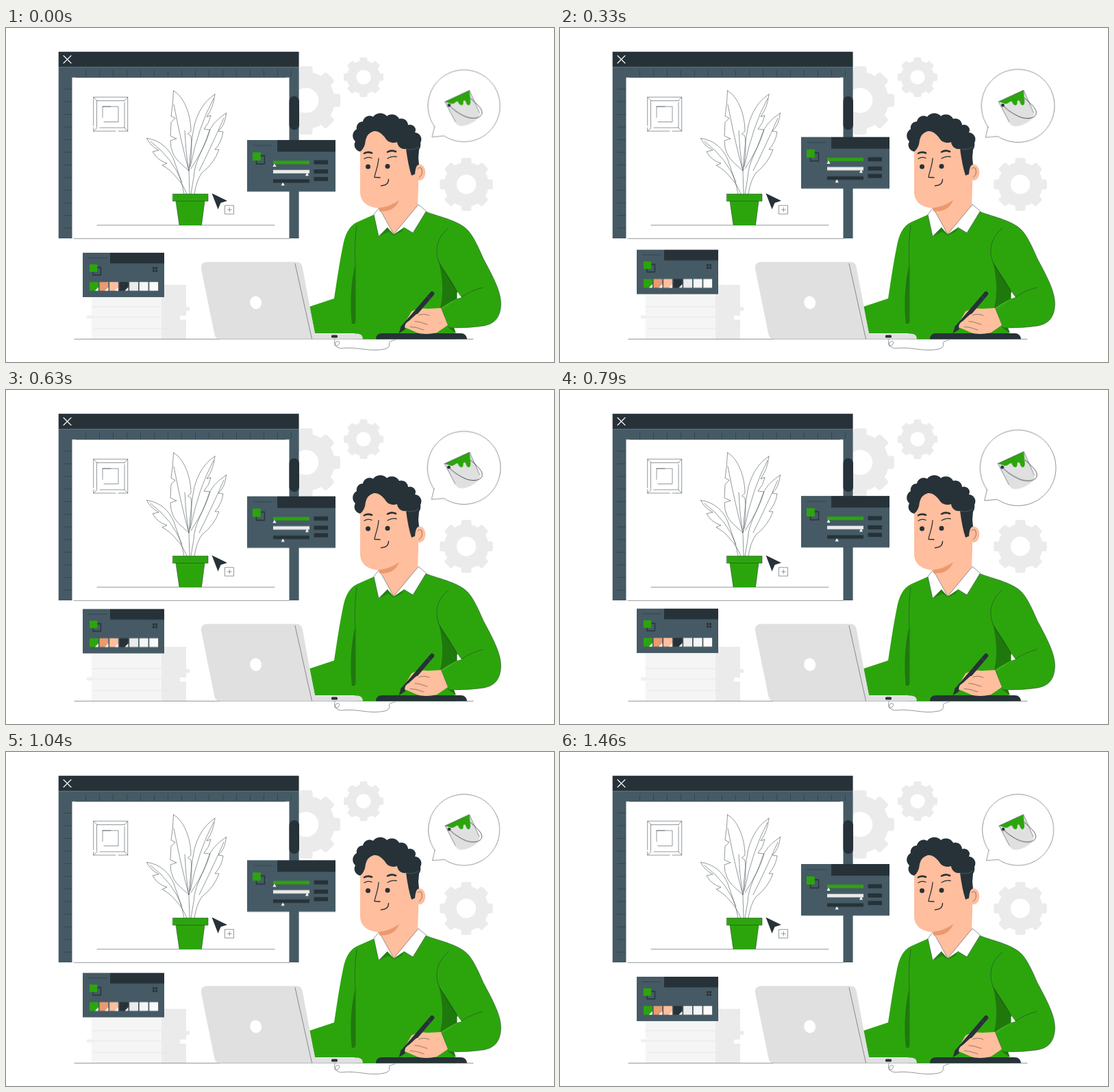
These frames come from a looping animation (800 px wide and 489 px high, 1.5 s). An HTML page:

```html
<!DOCTYPE html>
<html lang="en">
<head>
<meta charset="utf-8">
<title>Designer at work</title>
<style>
html, body { margin: 0; width: 100%; height: 100%; overflow: hidden; background: #fff; }
svg { display: block; width: 100%; height: 100%; }
.ink { fill: #263238; }
.slate { fill: #455a64; }
.green { fill: #2ca50d; }
.shade { fill: #1f780c; }
.skin { fill: #ffbe9d; }
.grey { fill: #e0e0e0; }
.pale { fill: #ebebeb; }
.white { fill: #fff; }
.line { fill: none; stroke: #263238; stroke-width: .5; stroke-linecap: round; stroke-linejoin: round; }
.bold { stroke-width: 1.3; }
.float, .beat { animation: float 1.5s linear -19ms infinite; }
.beat { animation-name: beat; transform-origin: 668px 113.5px; }
@keyframes float {
  0%, 100% { transform: translateY(.3px); }
  50% { transform: translateY(-9.7px); }
}
@keyframes beat {
  0%, 30%, 40%, 70%, 100% { transform: scale(1); }
  10%, 50% { transform: scale(1.08); }
}
</style>
</head>
<body>
<svg viewBox="0 0 800 489" preserveAspectRatio="none">
  <defs>
    <path id="tooth" d="M-11 0L-9.5 -47Q-9 -50 -6 -50H6Q9 -50 9.5 -47L11 0L9.5 47Q9 50 6 50H-6Q-9 50 -9.5 47Z"/>
    <g id="gear">
      <circle r="42"/>
      <use href="#tooth"/>
      <use href="#tooth" transform="rotate(45)"/>
      <use href="#tooth" transform="rotate(90)"/>
      <use href="#tooth" transform="rotate(135)"/>
      <circle r="18.3" class="white"/>
    </g>
    <path id="knob" class="white" d="M0 -2.3L2.6 2.3H-2.6Z"/>
  </defs>

  <!-- gears -->
  <g class="pale">
    <use href="#gear" transform="translate(438 106)"/>
    <use href="#gear" transform="translate(522 72) scale(.58)"/>
    <use href="#gear" transform="translate(672 229) scale(.775)"/>
  </g>

  <!-- editor window -->
  <path class="slate" d="M76.7 57H427.6V308H76.7Z"/>
  <path class="ink" d="M76.7 34.7H427.6V57H76.7Z"/>
  <path class="white" d="M96.5 72.5H413.5V309H96.5Z"/>
  <path d="M77 57.3H427.5V72" fill="none" stroke="#78909c" stroke-width=".6"/>
  <path d="M84 40.5L95 51.5M95 40.5L84 51.5" stroke="#fff" stroke-width="1.1" stroke-linecap="round"/>
  <g id="ticks" class="line"></g>
  <path class="line" d="M102 72.3H408M99 308.3H413.5M133 288.7H278M281 288.7H392"/>
  <rect class="ink" x="413.5" y="100" width="14.5" height="49" rx="7"/>

  <!-- picture frame -->
  <path class="line" d="M127.7 143V101.2H177.7V151H164M160 151H127.7V146M132.5 145V106.5H173M173 109V146H137M141 131V115H164V137.5H143M153 115H141M127.7 101.2L133 106.5M177.7 101.2L173 106.5M177.7 151L173 146M127.7 151L133 146"/>

  <!-- plant -->
  <g class="line">
    <path d="M244.5 92C259 99 270 126 270 151L265.5 155L270 158Q273 183 267 209C262 204 248 194 244 184Q240 176 240 165L249 162L240 158L241 138L247 132L241 129Q244 110 244.5 92Z"/>
    <path d="M245 112Q257 174 267 209L268 243M261 150Q262 178 266 205"/>
    <path d="M305 97C290 107 281 121 275 142Q270 166 267 209M305 97Q303 116 293 130L299 128Q297 139 289 148L298 149Q292 172 270 206M303 103Q281 144 269 203"/>
    <path d="M321.5 124.5Q299 139 294 158C287 181 275 196 274 219L270 243M321.5 124.5Q320 142 310 151L317 152Q315 167 305 178L311 178Q304 198 286 212Q278 223 275 243M318 132Q298 177 282 209"/>
    <path d="M205.5 161.5C226 164 239 178 245 193C251 211 257 225 260 243M205.5 161.5Q210 172 223 179L214 181Q221 194 235 198L228 201Q241 208 249 219Q258 228 264 243M211 166Q244 191 257 226"/>
  </g>
  <path class="green" d="M243.5 243H295V253.5H290L285.5 289H253L248 253.5H243.5Z"/>
  <path class="line" d="M243.5 243H295V253.5H243.5ZM248 254L253 288M290 254L285.5 288"/>

  <!-- pointer -->
  <path class="ink" d="M300.5 242L323 253L313.5 256L309.5 265.5Z"/>
  <path class="line" d="M319.8 259.8H332.5V272.3H319.8ZM323.3 266H329.3M326.3 263V269"/>

  <!-- paper stack -->
  <path d="M125 376H227V455H125ZM118 420H126V426H118Z" fill="#f5f5f5"/>
  <path class="pale" d="M227 376H263V408.5H268V414H263V455H227Z"/>
  <path class="white" d="M254 421H264V427H254Z"/>
  <path d="M125 408H227M118 423H227M128 440H236" fill="none" stroke="#e6e6e6"/>

  <!-- sliders panel -->
  <g class="float">
    <path class="slate" d="M352 164H481V239.6H352Z"/>
    <path class="ink" d="M396 164H481V181H396ZM390 221.5H443V226.5H390ZM449.5 193.5H470V199.5H449.5ZM449.5 207H470V213H449.5ZM449.5 218H470V224H449.5Z"/>
    <path class="line" d="M361 172H388"/>
    <path class="line bold" d="M365.5 187H377.5V199H365.5Z"/>
    <path class="green" d="M360 182H371.8V194H360ZM390 194.2H443V199.2H390Z"/>
    <path class="pale" d="M390 207.7H443V212.7H390Z"/>
    <use href="#knob" x="392" y="200.7"/>
    <use href="#knob" x="439.5" y="214"/>
    <use href="#knob" x="404.2" y="228.2"/>
  </g>

  <!-- swatches panel -->
  <g class="float">
    <path class="slate" d="M112 329H231V394H112Z"/>
    <path class="ink" d="M152 329H231V344.5H152ZM214 350H217V353H214ZM218 350H221V353H218ZM214 354H217V357H214ZM218 354H221V357H218Z"/>
    <path class="line" d="M120 336.5H147"/>
    <path class="line bold" d="M127 350.5H138.5V361.5H127Z"/>
    <path class="green" d="M122 346H133.3V357H122Z"/>
    <g id="swatches"></g>
  </g>

  <!-- thought bubble -->
  <g class="beat">
    <path class="line" style="fill:#fff" d="M626 144L622.5 159L640 157.5A52.1 52.1 0 1 0 626 144Z"/>
    <path class="grey" d="M641 108L676.5 91.5L691 124Q692 134 675 141Q661 146 657 139Z"/>
    <path class="green" d="M641 108L676.5 91.5L678 108Q677.5 114 674.5 113Q672 112 671 107.5Q668.5 104.5 667.5 108Q668 113.5 664.5 113Q661 112 660 108Q658 106.5 656 109Q653 112 649 110.5Z"/>
    <path class="line" d="M641 108L676.5 91.5L691 124M641 108L656 137"/>
    <path class="line" style="stroke-width:.8" d="M647 113C652 119 662 126 672 130C684 134 695 131 694.5 123C694 117 686 110 678 103"/>
    <circle class="ink" cx="647" cy="113" r="2.3"/>
  </g>

  <!-- desk -->
  <path class="line" d="M100 455.5H682"/>

  <!-- sweater -->
  <path class="green" d="M540 272L513 284C500 290 495 303 492 318C487 342 483 370 479 396L443 408L451 447H509V455.5H657L654 439L646 438L636 411L659 396L658 350L640 310L613 269L566 303Z"/>
  <path class="green" d="M613 269C634 277 662 282 675 297C683 306 690 322 697 338C712 366 722.5 386 722.5 404C722 424 713 433 698 436Q670 440 646 438.5L636 411L659 396L665 394C656 382 645 360 632 343L600 290Z"/>
  <path class="shade" d="M632 343C642 358 652 372 659 386V396Q646 402 634 410Q641 380 632 343ZM509.5 348C503 374 502 410 505 433H509.5ZM654 439L657 447L646 439Z"/>
  <path class="white" d="M658.5 387L665 394L658.5 396Z"/>
  <path class="line" d="M632 343C624 321 632 304 646 293M512 289Q508 318 510 349V430M613 269C634 277 662 282 675 297C683 306 690 322 697 338C712 366 722.5 386 722.5 404C722 424 713 433 698 436Q670 440 646 438.5L636 411M632 343Q648 372 665 394Q677 385 696 380"/>

  <!-- neck and collar -->
  <path class="skin" d="M545 250L601 215V260L566 303L545 266Z"/>
  <path class="white" d="M545 263L537 273L544 305L557 292L566 302Z"/>
  <path class="white" d="M602 258.5L613.5 268L594 300L581 292L566 302Z"/>
  <path class="line" d="M545 263L537 273L544 305L557 292M602 258.5L613.5 268L594 300L581 292M545 264L566 302L602 258.5"/>
  <path class="shade" d="M557 292L566 302L581 292L578 298L566 304L558 298L546 305Z" opacity=".75"/>

  <!-- head -->
  <ellipse class="skin" cx="604" cy="211.5" rx="8.3" ry="11.7"/>
  <path class="skin" d="M517 178L528 150L560 146L602 172V232L601 260L577 250C569 262 559 266 546 264C527 263 517 254 517 240Z"/>
  <path d="M544 263.5Q560 262 574 252Q567 270 545 268.5Z" fill="#eb996e"/>
  <path class="line" d="M601 206Q606 202 607 207M603 219Q609 215 607 207"/>
  <path class="ink" d="M517 181A10 10 0 0 1 510 166A11 11 0 0 1 512 148A9 9 0 0 1 521 137A10 10 0 0 1 536 130A13 13 0 0 1 556 129A12 12 0 0 1 574 133A10 10 0 0 1 587 142A8 8 0 0 1 597 153A10 10 0 0 1 605 168Q606 174 603 178L602 190L603 200Q598 200 597 214L592 216Q587 201 584 177A11 11 0 0 1 571 167A14 14 0 0 1 553 160Q545 150 537 151Q527 154 525 164Q524 176 517 181Z"/>
  <path d="M584 177Q594 180 603 174" fill="none" stroke="#607d8b" stroke-width=".5"/>
  <circle class="ink" cx="528.5" cy="203" r="3.5"/>
  <circle class="ink" cx="557" cy="202.5" r="3.5"/>
  <path class="line" style="stroke-width:2.6" d="M523 183.5Q528 180.5 534 183M557 181.5Q563 178 569 181"/>
  <path class="line bold" d="M523 191.5Q528 188 534 190.5M557 191Q563 187 570 188.5"/>
  <path class="line bold" d="M544 191C543 204 539 211 538 218.5L546 219"/>
  <path class="line bold" d="M558.5 221.5Q558.5 230.5 547.5 231"/>

  <!-- laptop -->
  <path class="grey" d="M293 342.5H424Q431 342.5 432.5 349L451 447.5H513Q521 448 521 455.5H313Q306 455.5 304.5 449L285 353Q284 343 293 342.5Z"/>
  <path class="line" d="M422 345L446.5 455"/>
  <ellipse class="white" cx="364.7" cy="402" rx="8.5" ry="9.5" transform="rotate(-12 364.7 402)"/>
  <rect class="ink" x="475" y="449.5" width="9" height="4" rx="1.5"/>

  <!-- tablet, cable, hand -->
  <path class="line" d="M480 456C479 464 480 467 484 465C488 462 487 457 483 459C478 461 481 469 490 469C514 466 530 475 553 470C567 466 551 459 568 457"/>
  <path class="ink" d="M540 455.5Q540 447 549 447H664Q672 447 673 455.5Z"/>
  <path class="skin" d="M584 439Q581 433 585 427L592 415Q604 409 616 411L635 410L645 435Q638 440 629 446Q612 450 600 446Z"/>
  <path class="line" d="M601 421Q610 417 618 421M591 429Q603 429 615 434M586 437Q598 437 610 442"/>
  <path class="line" style="stroke-width:6.5" d="M580 438L622 389"/>
  <path class="ink" d="M573.5 447L577 435.5L583 441Z"/>
  <path d="M614.5 392L620 397" stroke="#455a64" stroke-width=".8"/>
  <path class="skin" d="M582 438.5Q582 432 588 429L599 419Q604 418 602 423L592 435Q588 441 582 438.5Z"/>
</svg>
<script>
const add = (id, d, style) => {
  const path = document.createElementNS("http://www.w3.org/2000/svg", "path");
  path.setAttribute("d", d);
  if (style) path.setAttribute("style", style);
  document.getElementById(id).append(path);
};

// rulers
for (let i = 0; i < 16; i++) add("ticks", `M${116.5 + i * 20} 62V71`);
for (let i = 0; i < 12; i++) add("ticks", `M84 ${89.5 + i * 18.5}H95.5`);

// palette; the first four colours have a folded corner
["#2ca50d", "#eb996e", "#ffbe9d", "#263238", "#ebebeb", "#f5f5f5", "#fafafa"].forEach((color, i) => {
  const x = 122 + i * 14.55;
  add("swatches", `M${x} 371.8h12.8v12.8h-12.8Z`, `fill:${color}`);
  if (i < 4) add("swatches", `M${x + 12.8} 379.6v5h-5Z`, "fill:#fff");
});
</script>
</body>
</html>
```
